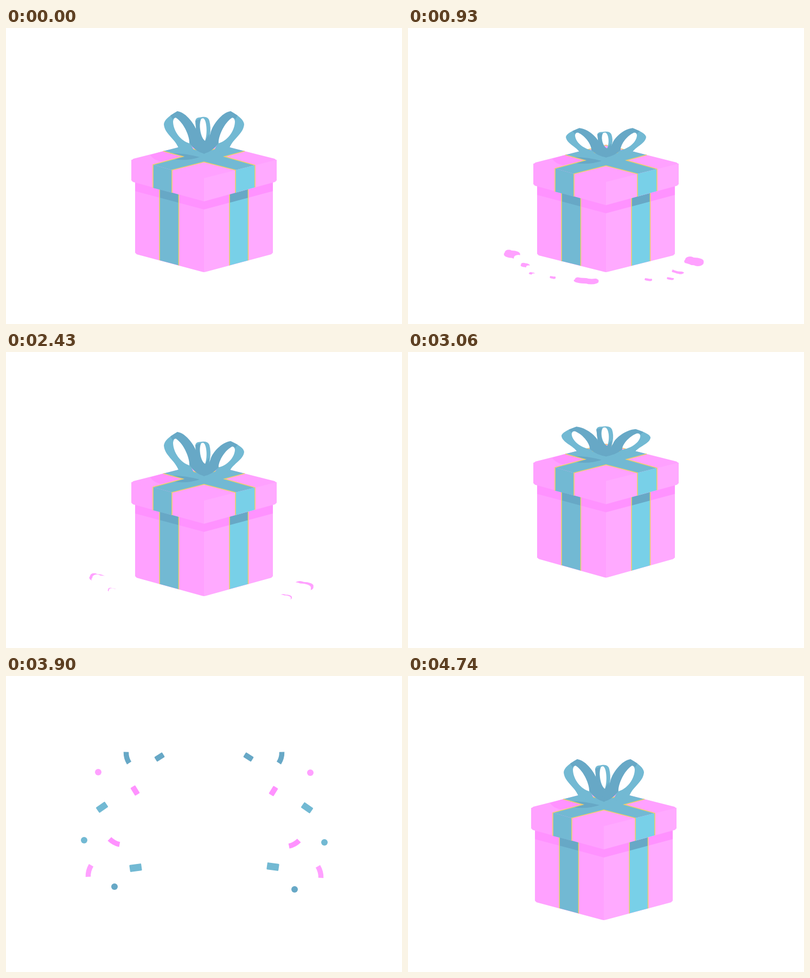
These frames come from a looping animation (730 px wide and 548 px high, 4770 ms). An HTML page with a canvas:

```html
<!DOCTYPE html>
<html lang="en">
<head>
<meta charset="utf-8">
<title>Gift box</title>
<style>
html, body { margin: 0; width: 100%; height: 100%; overflow: hidden; background: #fff; }
canvas { display: block; width: 730px; height: 548px; }
</style>
</head>
<body>
<canvas id="stage" width="730" height="548"></canvas>
<script>
const ctx = document.getElementById('stage').getContext('2d');
const LOOP = 4770, STEP = 30, CX = 365;
const PINK = '#ffa1ff', PALE = '#ffaaff', DEEP = '#ff92ff';
const BLUE = '#72b9d3', SKY = '#78d0e8', DARK = '#67a8c6', GOLD = '#efcf68';

const clamp = (v, a = 0, b = 1) => Math.min(b, Math.max(a, v));
const ease = u => (1 - Math.cos(Math.PI * clamp(u))) / 2;

// Each hop: take-off time, rise and fall durations, height
const hops = [
  { at: 455, rise: 180, fall: 180, height: 132 },
  { at: 1805, rise: 180, fall: 180, height: 132 },
  { at: 3035, rise: 200, fall: 50, height: 146 }
];
const BURST = 3450, SLIDE = 4235;

// Pose rows: time, squash, left loop, right loop, middle loop, bow width
const REST = [0, 1, 1, 1, 1];
const takeoff = [
  [-365, ...REST],
  [-200, 9, .8, .8, .82, 1],
  [-60, 14, .68, .68, .7, 1],
  [25, -5, .7, .64, .82, 1.11],
  [110, -5, 1.12, 1.12, 1.08, 1]
];
const landing = [
  [0, -3, 1.14, 1.14, 1.1, .97],
  [55, 14, .62, .62, .64, 1.03],
  [115, 7, .69, .69, .7, 1],
  [195, -4, 1.06, .95, 1, 1],
  [265, -3, 1.04, .82, .94, 1],
  [375, -5, 1.04, 1.05, 1, 1],
  [490, ...REST]
];
const crash = [
  landing[0], landing[1],
  [165, -14, 1.15, 1.15, 1.1, 1]
];

const shift = (rows, by) => rows.map(([t, ...v]) => [t + by, ...v]);
const poses = [[0, ...REST]];
hops.forEach((hop, i) => {
  hop.land = hop.at + hop.rise + hop.fall;
  poses.push(...shift(takeoff, hop.at), ...shift(i === 2 ? crash : landing, hop.land));
});

function poseAt(t) {
  if (t > SLIDE) return REST;
  const i = poses.findIndex(row => row[0] > t);
  if (i < 0) return poses[poses.length - 1].slice(1);
  const a = poses[i - 1], b = poses[i], u = ease((t - a[0]) / (b[0] - a[0]));
  return a.slice(1).map((v, k) => v + (b[k + 1] - v) * u);
}

function heightAt(t) {
  const hop = hops.find(h => t > h.at && t < h.land);
  if (!hop) return 0;
  const s = t - hop.at - hop.rise;
  return hop.height * (1 - (s / (s < 0 ? hop.rise : hop.fall)) ** 2);
}

function poly(color, ...pts) {
  ctx.fillStyle = color;
  ctx.beginPath();
  pts.forEach(p => ctx.lineTo(...p));
  ctx.fill();
}

function trim(...pts) {
  ctx.strokeStyle = GOLD;
  ctx.lineWidth = 1.6;
  ctx.beginPath();
  pts.forEach(p => ctx.lineTo(...p));
  ctx.stroke();
}

function shape(color, path) {
  ctx.fillStyle = color;
  ctx.fill(path, 'evenodd');
}

const loopLight = new Path2D('M316 154C300 163 292 170 291 178C292 196 311 204 318 222L350 234L340 214C322 210 308 190 308 173Q309 166 313 166Z');
const loopDark = new Path2D('M316 154C332 156 350 180 353 195L366 233Q349 229 338 213C339 203 329 176 313 166Q308 166 308 170L303 162Z');
const midLoop = new Path2D('M349 172Q350 165 358 165.500Q372 162 375 172C379 188 377 208 366 233C349 210 351 188 349 172ZM360 168C354 180 360 205 367 209C372 195 370 168 363 167Z');
const midShade = new Path2D('M349 172L358 168C355 188 359 204 367 209L374 196Q376 212 366 233C349 210 351 188 349 172Z');
const pinkShade = new Path2D('M266 235L290 228L326 238L285 247Q271 244 266 235Z');
const blueShade = new Path2D('M302 232Q328 231 357 239Q333 247 310 243L326 238Z');

function scaled(sx, sy, draw) {
  ctx.save();
  ctx.translate(CX, 232);
  ctx.scale(sx, sy);
  ctx.translate(-CX, -232);
  draw();
  ctx.restore();
}

function drawBow(left, right, mid, width) {
  scaled(width, mid, () => {
    shape(BLUE, midLoop);
    shape(DARK, midShade);
  });
  const side = () => {
    shape(BLUE, loopLight);
    shape(DARK, loopDark);
  };
  scaled(width, left, side);
  scaled(-width, right, side);
}

function drawBody(top, bottom, squash) {
  const corner = bottom + 418 + squash * .3, tip = bottom + 452;
  const floorY = x => tip + (corner - tip) * Math.abs(x - CX) / 127;
  const shadeY = x => top + 336 - .268 * Math.abs(x - CX);
  const lip = top + 268;

  poly(PINK, [238, lip], [CX, lip], [CX, tip], [362, tip - .5], [241, corner + 1], [238, corner - 2]);
  poly(PALE, [492, lip], [CX, lip], [CX, tip], [368, tip - .5], [489, corner + 1], [492, corner - 2]);
  poly(DEEP, [238, lip], [492, lip], [492, shadeY(492)], [CX, shadeY(CX)], [238, shadeY(238)]);

  [[283, 318.5, BLUE], [412, 446.5, SKY]].forEach(([a, b, color]) => {
    poly(color, [a, lip], [b, lip], [b, floorY(b)], [a, floorY(a)]);
    poly(DARK, [a, lip], [b, lip], [b, shadeY(b)], [a, shadeY(a)]);
    trim([a, lip], [a, floorY(a)]);
    trim([b, lip], [b, floorY(b)]);
  });
}

function drawLid() {
  poly(PINK, [231, 245], [235, 242], [CX, 209], [495, 242], [499, 245], [CX, 279]);
  poly(PINK, [231, 244], [CX, 278], [CX, 321], [234, 285], [231, 282]);
  poly(PALE, [499, 244], [CX, 278], [CX, 321], [496, 285], [499, 282]);
  shape(DEEP, pinkShade);

  // Ribbons across the top, then down both faces
  poly(BLUE, [271, 253], [326, 238], [290, 228], [325, 219], [CX, 229], [405, 219],
    [440, 228], [403, 238], [459, 254], [423, 263], [CX, 248], [306, 263]);
  poly(BLUE, [271, 253], [306, 263], [306, 305], [271, 296]);
  poly(SKY, [459, 254], [423, 263], [423, 305], [459, 295]);
  shape(DARK, blueShade);

  trim([290, 228], [326, 238], [271, 253], [271, 296]);
  trim([440, 228], [403, 238], [459, 254], [459, 295]);
  trim([306, 305], [306, 263], [CX, 248], [423, 263], [423, 305]);
  trim([325, 219], [CX, 229], [405, 219]);
  trim([328, 219], [CX, 210], [402, 219]);
}

function drawBox(t) {
  const gone = t > BURST && t < SLIDE;
  const size = gone ? 1 - clamp((t - BURST) / 90) : 1;
  if (!size) return;
  const [squash, left, right, mid, width] = poseAt(t);
  const bottom = -heightAt(t), top = bottom + squash;
  const slide = t >= SLIDE ? 515 * (1 - ease((t - SLIDE) / (LOOP - SLIDE))) : 0;

  ctx.save();
  ctx.translate(CX - slide, 330);
  ctx.scale(size, size);
  ctx.translate(-CX, -330);
  drawBody(top, bottom, squash);
  ctx.translate(0, top);
  drawLid();
  drawBow(left, right, mid, width);
  ctx.restore();
}

// Dust puffs: x, y, width, height, life
const puffs = [
  [194, 421, 30, 17, 330], [218, 441, 17, 9, 310], [230, 456, 11, 5, 220],
  [268, 463, 11, 6, 220], [329, 469, 46, 14, 240], [442, 467, 14, 6, 220],
  [482, 465, 13, 6, 220], [496, 452, 23, 11, 310], [525, 434, 36, 18, 330]
];

function lump(x, y, w, h, color) {
  ctx.fillStyle = color;
  ctx.beginPath();
  [[0, 0, .5, .4], [-.2, -.2, .25, .3], [.2, .12, .3, .38]].forEach(([dx, dy, rx, ry]) => {
    ctx.moveTo(x + (dx + rx) * w, y + dy * h);
    ctx.ellipse(x + dx * w, y + dy * h, rx * w, ry * h, 0, 0, 2 * Math.PI);
  });
  ctx.fill();
}

function drawDust(t) {
  hops.forEach((hop, i) => {
    const age = t - hop.land;
    if (age < 0 || age > 330) return;
    const spread = (.75 + .47 * (1 - Math.exp(-age / 140))) * (i === 2 ? 1.06 : 1);
    const grow = clamp(.6 + age / 200);
    puffs.forEach(([x, y, w, h, life]) => {
      if (age >= life) return;
      const px = CX + (x - CX) * spread, py = 405 + (y - 405) * spread - age * .02;
      lump(px, py, w * grow, h * grow, PINK);
      // A clear patch eats each puff from the inside
      const eaten = clamp((age - 70) / (life - 70));
      if (!eaten) return;
      const away = 1.05 * (1 - eaten), front = y > 460;
      const dx = front ? 0 : Math.sign(CX - x) * away * w * .7;
      const dy = (front ? -1 : .7) * away * h;
      lump(px + dx, py + dy, w * 1.1, h * 1.1, '#fff');
    });
  });
}

// Confetti: x, y, kind, size, angle, colour, offset of the mirrored twin
const confetti = [
  [224, 151, 'curl', 21, 68, DARK, 0, 0],
  [283, 150, 'card', 17, -33, DARK, 0, 0],
  [170, 178, 'dot', 12, 0, PINK, 1, 1],
  [238, 212, 'card', 17, 58, DEEP, 1, 1],
  [177, 243, 'card', 20, -35, BLUE, 2, 1],
  [144, 304, 'dot', 12, 0, BLUE, 1, 4],
  [200, 307, 'curl', 21, 22, DEEP, 1, 3],
  [154, 361, 'curl', 22, 98, PINK, 2, 2],
  [239, 355, 'card', 22, -8, BLUE, 1, -2],
  [200, 390, 'dot', 12, 0, DARK, 2, 5]
];

function drawPiece(x, y, kind, size, angle, color, scale, flip) {
  ctx.save();
  ctx.translate(x, y);
  ctx.scale(flip * scale, scale);
  ctx.rotate(angle * Math.PI / 180);
  ctx.fillStyle = ctx.strokeStyle = color;
  ctx.beginPath();
  if (kind === 'dot') {
    ctx.arc(0, 0, size / 2, 0, 2 * Math.PI);
    ctx.fill();
  } else if (kind === 'card') {
    ctx.roundRect(-size / 2, -size * .3, size, size * .6, 1.5);
    ctx.fill();
  } else {
    ctx.lineWidth = 9.5;
    ctx.moveTo(-size / 2, -1.5);
    ctx.quadraticCurveTo(0, 3, size / 2, 1);
    ctx.stroke();
  }
  ctx.restore();
}

function drawConfetti(t) {
  const age = t - BURST;
  if (age <= 0 || t > 4350) return;
  const spread = 1.04 * (1 - Math.exp(-age * .00724));
  const drop = 38 * (Math.max(0, age - 450) / 400) ** 2;
  const scale = clamp(.4 + age / 250) * (1 - ease((t - 4020) / 330));
  const spin = (age - 450) * .05;
  confetti.forEach(([x, y, kind, size, angle, color, dx, dy]) => {
    [[1, x, y], [-1, 730 - x + dx, y + dy]].forEach(([flip, ex, ey]) => {
      const px = CX + (ex - CX) * spread, py = 300 + (ey - 300) * spread + drop;
      drawPiece(px, py, kind, size, angle + spin, color, scale, flip);
    });
  });
}

function frame(now) {
  const t = Math.floor(now % LOOP / STEP) * STEP;
  ctx.fillStyle = '#fff';
  ctx.fillRect(0, 0, 730, 548);
  drawDust(t);
  drawConfetti(t);
  drawBox(t);
  requestAnimationFrame(frame);
}
frame(0);
</script>
</body>
</html>
```
